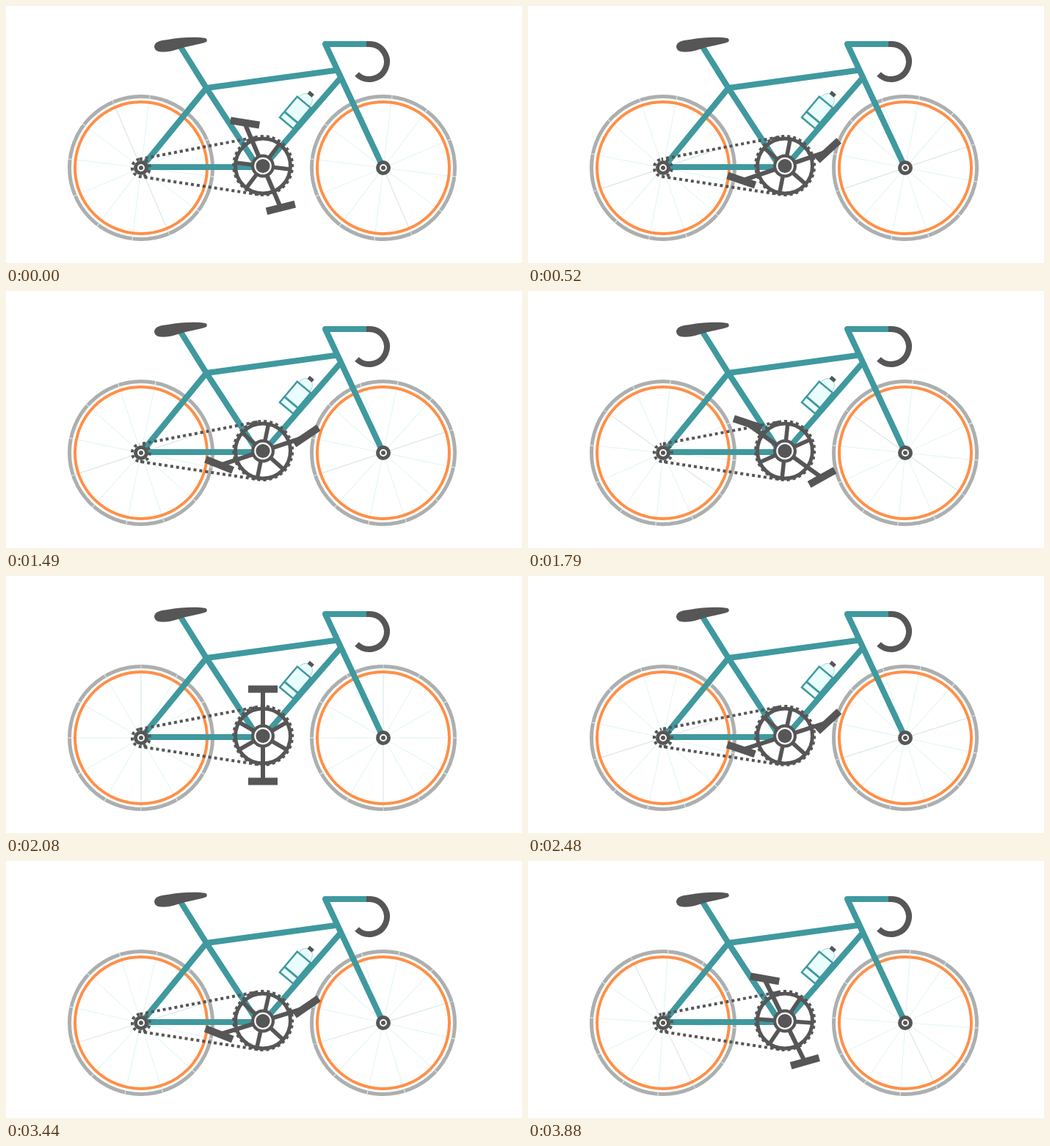
An HTML page that plays this animation: 703 by 351 pixels, repeating every 3930 ms.

```html
<!DOCTYPE html>
<html lang="en">
<head>
<meta charset="utf-8">
<title>Bicycle</title>
<style>
  html, body { margin: 0; height: 100%; overflow: hidden; background: #fff; }
  svg { display: block; width: 703px; height: 351px; }
  .teal { stroke: #3f999e; }
  .dark { stroke: #565656; }
  .solid { fill: #565656; stroke: none; }
</style>
</head>
<body>
<svg viewBox="0 0 703 351" fill="none">
  <defs>
    <g id="spokes">
      <path id="pair" d="M0-100V100" stroke="#d3e3e3"/>
      <g stroke="#e0f5f5">
        <path d="M0-100V100" transform="rotate(30)"/>
        <path d="M0-100V100" transform="rotate(60)"/>
        <path d="M0-100V100" transform="rotate(90)"/>
        <path d="M0-100V100" transform="rotate(120)"/>
        <path d="M0-100V100" transform="rotate(150)"/>
      </g>
    </g>
    <g id="hub">
      <circle class="solid" r="10"/>
      <circle r="4" stroke="#fff" stroke-width="2"/>
    </g>
    <rect id="pedal" class="solid" x="-20" y="-6" width="40" height="10"/>
  </defs>

  <g id="wheels"></g>

  <!-- bottle -->
  <g transform="translate(381.5 160.5) rotate(40)" fill="#e9fdfd">
    <path d="M-10-38Q-9-49-3-50H3Q9-49 10-38Z" stroke="#a9dcdd"/>
    <rect class="teal" x="-12" y="-38" width="24" height="37" stroke-width="2.5"/>
    <path class="teal" d="M-12-11H12" stroke-width="3"/>
    <rect class="solid" x="-4" y="-55" width="8" height="5"/>
  </g>

  <!-- frame -->
  <g class="teal" stroke-width="8" stroke-linejoin="round">
    <path d="M238 56L273 112L342 218"/>
    <path d="M342 220H185L273 112L452 87.5"/>
    <path d="M456 98L352 218"/>
    <path d="M491 52H435L513 219"/>
  </g>
  <path class="dark" stroke-width="8" d="M491 52H495A24 24 0 1 1 478 93"/>
  <path class="solid" d="M202 55C203 49 209 47 220 46C240 42 262 42 272 44Q275 46 273 49C262 53 246 55 234 59C226 62 214 64 207 62Q202 60 202 55Z"/>

  <use href="#hub" x="184" y="221"/>
  <use href="#hub" x="514" y="221"/>

  <!-- chain, then the free teeth of both gears -->
  <path id="chain" class="dark" stroke-width="4" stroke-dasharray="4 4"
    d="M181.8 209.2L342.6 178.7A40 40 0 1 1 344 257.5L182.2 232.9A12 12 0 0 1 181.8 209.2
       M344 257.5A40 40 0 0 1 342.6 178.7M181.8 209.2A12 12 0 1 1 182.2 232.9"/>

  <g transform="translate(350 218.5)">
    <circle class="dark" r="37.5" stroke-width="5"/>
    <g id="crank" class="dark">
      <path d="M0-63V63" stroke-width="6"/>
      <path d="M0-37V37" stroke-width="5.5" transform="rotate(60)"/>
      <path d="M0-37V37" stroke-width="5.5" transform="rotate(120)"/>
    </g>
    <circle class="solid" r="16"/>
    <circle r="10.7" stroke="#fff" stroke-width="2.2"/>
    <use id="pedalA" href="#pedal"/>
    <use id="pedalB" href="#pedal"/>
  </g>
</svg>
<script>
const LOOP = 3930, FIRST = 70, STEP = 48.8, LAST = 79;
const $ = id => document.getElementById(id);
const rad = deg => deg * Math.PI / 180;

$('wheels').innerHTML = [184, 514].map(x => `
  <g transform="translate(${x} 221)">
    <circle r="97.5" stroke="#acafaf" stroke-width="5"/>
    <g class="spin"><use href="#spokes"/></g>
    <circle r="90" stroke="#ff8f47" stroke-width="4"/>
  </g>`).join('');
const turning = [$('crank'), ...document.querySelectorAll('.spin')];

// The animation advances in held steps; the opening pose is held longer.
function angleAt(t) {
  if (t < FIRST) return -23;
  const step = Math.min(LAST, 1 + Math.floor((t - FIRST) / STEP));
  return 9.027 * (step - 42);
}

// A pedal tips forward on the right side and back, less, on the left.
function placePedal(el, angle, right, left) {
  const s = Math.sin(rad(angle)), c = Math.cos(rad(angle));
  const tilt = -s * (s > 0 ? right : left);
  el.setAttribute('transform', `translate(${63 * s} ${-63 * c}) rotate(${tilt})`);
}

function draw(now) {
  const angle = angleAt(now % LOOP);
  for (const el of turning) el.setAttribute('transform', `rotate(${angle})`);
  placePedal($('pedalA'), angle, 45, 23);
  placePedal($('pedalB'), angle + 180, 36, 20);
  $('chain').setAttribute('stroke-dashoffset', -40 * rad(angle));
  requestAnimationFrame(draw);
}

let start;
requestAnimationFrame(function begin(now) {
  start = now;
  const tick = t => draw(t);
  tick(0);
});
</script>
</body>
</html>
```
